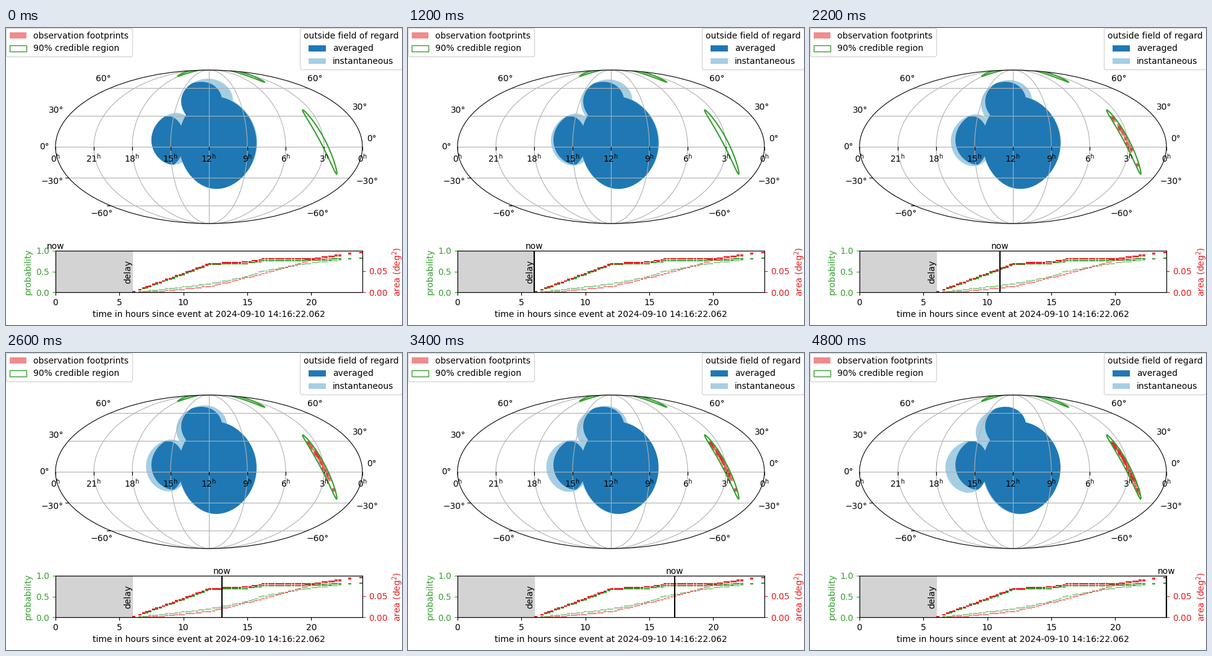
Animation of 640x480 px, one loop 5 s. Source, as a matplotlib script:

```python
import numpy as np
import matplotlib.pyplot as plt
from matplotlib.animation import FuncAnimation
from matplotlib.patches import Ellipse, Patch, Polygon

HOURS = 24
BLUE, PALE_BLUE = "#1f78b4", "#a6cee3"
GREEN, RED, GRAY = "#33a02c", "#e31a1c", "#b0b0b0"
CX, CY, RX, RY = 328, 192, 248, 124
rng = np.random.default_rng(4)

fig = plt.figure(figsize=(6.4, 4.8), dpi=100)
sky = fig.add_axes([0, 0, 1, 1])
sky.set(xlim=(0, 640), ylim=(480, 0))
sky.axis("off")


def project(lon, lat):
    """Mollweide projection of degrees to stage pixels."""
    lat = np.radians(lat)
    theta = lat
    for _ in range(12):
        theta = theta - ((2 * theta + np.sin(2 * theta) - np.pi * np.sin(lat))
                         / (2 + 2 * np.cos(2 * theta)))
    return np.stack([CX + RX * np.asarray(lon) / 180 * np.cos(theta),
                     CY - RY * np.sin(theta) + 0 * np.asarray(lon)], axis=-1)


def cap(lon, lat, radius):
    """Outline of a circle on the sphere."""
    angle = np.linspace(0, 2 * np.pi, 180, endpoint=False)
    lat, r = np.radians([lat, radius])
    edge = np.arcsin(np.sin(lat) * np.cos(r) + np.cos(lat) * np.sin(r) * np.cos(angle))
    turn = np.arctan2(np.sin(angle) * np.sin(r) * np.cos(lat),
                      np.cos(r) - np.sin(lat) * np.sin(edge))
    return project(lon + np.degrees(turn), np.degrees(edge))


def bend(t, start, control, end):
    """Quadratic Bezier curve."""
    t = np.asarray(t)[:, None]
    return ((1 - t)**2 * np.array(start) + 2 * t * (1 - t) * np.array(control)
            + t**2 * np.array(end))


def sliver(start, control, end, half_width):
    """Thin bent ellipse along a curve."""
    s = np.linspace(0, 2 * np.pi, 120, endpoint=False)
    middle = bend((1 - np.cos(s)) / 2, start, control, end)
    along = np.subtract(end, start) / np.hypot(*np.subtract(end, start))
    across = np.array([-along[1], along[0]])
    return middle + half_width * np.sin(s)[:, None] * across


def tick(x, y, dx, dy):
    sky.plot([x, x + dx], [y, y + dy], color="black", lw=0.8, zorder=1.6)


# Map frame, grid and labels
outline = Ellipse((CX, CY), 2 * RX, 2 * RY, fc="none", ec="black", lw=0.8, zorder=4)
sky.add_patch(outline)
phi = np.linspace(-np.pi / 2, np.pi / 2, 181)
for k in range(-4, 5):
    x = CX + 62 * k
    if abs(k) < 4:
        sky.plot(CX + 62 * k * np.cos(phi), CY - RY * np.sin(phi),
                 color=GRAY, lw=0.8, zorder=1.5)
    tick(x, CY, 0, 4.9)
    sky.text(x, 216.5, rf"${(12 - 3 * k) % 24}^\mathrm{{h}}$", ha="center", va="baseline")

LABELS = {60: (157, 82, 499, 82), 30: (81, 133, 572.5, 128), 0: (62, 192, 591, 179),
          -30: (75, 248, 583.5, 248), -60: (154.5, 300, 503.5, 300)}
for lat, (xl, yl, xr, yr) in LABELS.items():
    ends = project([-180, 180], lat)
    sky.plot(*ends.T, color=GRAY, lw=0.8, zorder=1.5)
    if lat < 0:
        tick(*ends[0], -4.9, 0)
    for x, y in ((xl, yl), (xr, yr)):
        sky.text(x, y, f"{lat}°".replace("-", "−"), ha="center", va="center")

# Circles outside the field of regard: start, end, radius in degrees
BODIES = [((10.6, 4.6), (9.7, 4.2), 46),
          ((-2.75, 46.8), (-16.8, 42.4), 26),
          ((-42.6, 7.9), (-54.3, 4.9), 25)]
moving = []
for start, end, radius in BODIES:
    now = Polygon(cap(*start, radius), fc=PALE_BLUE, ec="none", zorder=0.5)
    sky.add_patch(now)
    moving.append(now)
    # The part covered all day is the overlap of the first and last circle
    always = Polygon(cap(*start, radius), fc=BLUE, ec="none", zorder=1)
    sky.add_patch(always)
    always.set_clip_path(Polygon(cap(*end, radius), transform=sky.transData))

# Credible region
MAIN = (479.5, 132.5), (515, 178), (534.5, 236)
for curve, half_width in ((MAIN, 3.9),
                          (((355, 66), (390, 73.5), (418, 87.5)), 1.5),
                          (((318, 66), (292, 70.5), (277.5, 78)), 1.4)):
    region = Polygon(sliver(*curve, half_width), fc="none", ec=GREEN, lw=1.5, zorder=2)
    sky.add_patch(region)
    region.set_clip_path(outline)

# Observation footprints: each early field is seen twice, the late ones follow
early = np.r_[0.87, rng.permutation(np.linspace(0.13, 0.72, 23))]
late = rng.permutation(np.linspace(0.7, 0.93, 8))
places = bend(np.r_[early, early, late], *MAIN)
places[:, 0] += np.tile(rng.uniform(-2, 2, 8), 7)
visits = np.r_[np.linspace(6.6, 12.4, 24), np.linspace(8, 21, 24), np.linspace(19, 24, 8)]
SQUARE = np.array([(-3.2, -2.2), (1.8, -3.2), (3.2, 2.2), (-1.8, 3.2)])
tiles = []
for hour, place in zip(visits, places):
    tile = Polygon(SQUARE + place, fc=RED, ec="none", alpha=0.5, zorder=1.2)
    sky.add_patch(tile)
    tiles.append((hour, tile))

# Legends
fig.legend(
    handles=[Patch(fc=RED, alpha=0.5, ec="none", label="observation footprints"),
             Patch(fc="none", ec=GREEN, label="90% credible region")],
    loc="upper left", borderaxespad=0)
fig.legend(
    handles=[Patch(fc=BLUE, label="averaged"), Patch(fc=PALE_BLUE, label="instantaneous")],
    title="outside field of regard", loc="upper right", borderaxespad=0)

# Timeline
timeline = fig.add_subplot(fig.add_gridspec(2, 1, height_ratios=[4, 1])[1])
timeline.set(xlim=(0, HOURS), ylim=(0, 1), xticks=range(0, 21, 5), yticks=[0, 0.5, 1])
timeline.set_xlabel("time in hours since event at 2024-09-10 14:16:22.062")
timeline.set_ylabel("probability", color=GREEN)
timeline.tick_params(axis="y", colors=GREEN)
timeline.axvspan(0, 6, color="lightgray")
timeline.text(6, 0.5, "delay", rotation=90, ha="right", va="center")

area = timeline.twinx()
area.set(ylim=(0, 0.097), yticks=[0, 0.05])
area.set_ylabel("area (deg$^2$)", color=RED)
area.tick_params(axis="y", colors=RED)

# Growth curves through a few knots, drawn as short dashes
KNOTS = [6, 8, 12, 15, 16, 20, 24]
GROWTH = [(GREEN, 1, [0.01, 0.22, 0.67, 0.70, 0.75, 0.77, 0.82]),
          (RED, 1, [0.02, 0.24, 0.69, 0.73, 0.79, 0.81, 0.97]),
          (GREEN, 0.5, [0, 0.06, 0.20, 0.38, 0.50, 0.71, 0.83]),
          (RED, 0.5, [0, 0.02, 0.14, 0.36, 0.43, 0.77, 0.96])]
dashes = np.r_[6, np.arange(6.5, 22.3, 0.26), 22.9, 23.75]
for color, alpha, values in GROWTH:
    level = np.round(np.interp(dashes, KNOTS, values) * 45) / 45
    timeline.hlines(level, dashes, dashes + 0.24, color=color, alpha=alpha, lw=1.5)

now_line = area.axvline(0, color="black", lw=1.5)
now_label = area.text(0, 1, "now", ha="center", va="bottom",
                      transform=area.get_xaxis_transform())


def update(hour):
    for patch, (start, end, radius) in zip(moving, BODIES):
        center = np.array(start) + np.subtract(end, start) * hour / HOURS
        patch.set_xy(cap(*center, radius))
    for visit, tile in tiles:
        tile.set_visible(hour >= visit)
    now_line.set_xdata([hour, hour])
    now_label.set_x(hour)
    return [*moving, now_line, now_label]


animation = FuncAnimation(fig, update, frames=HOURS + 1, interval=200,
                          repeat=True, repeat_delay=0)
plt.show()
```
